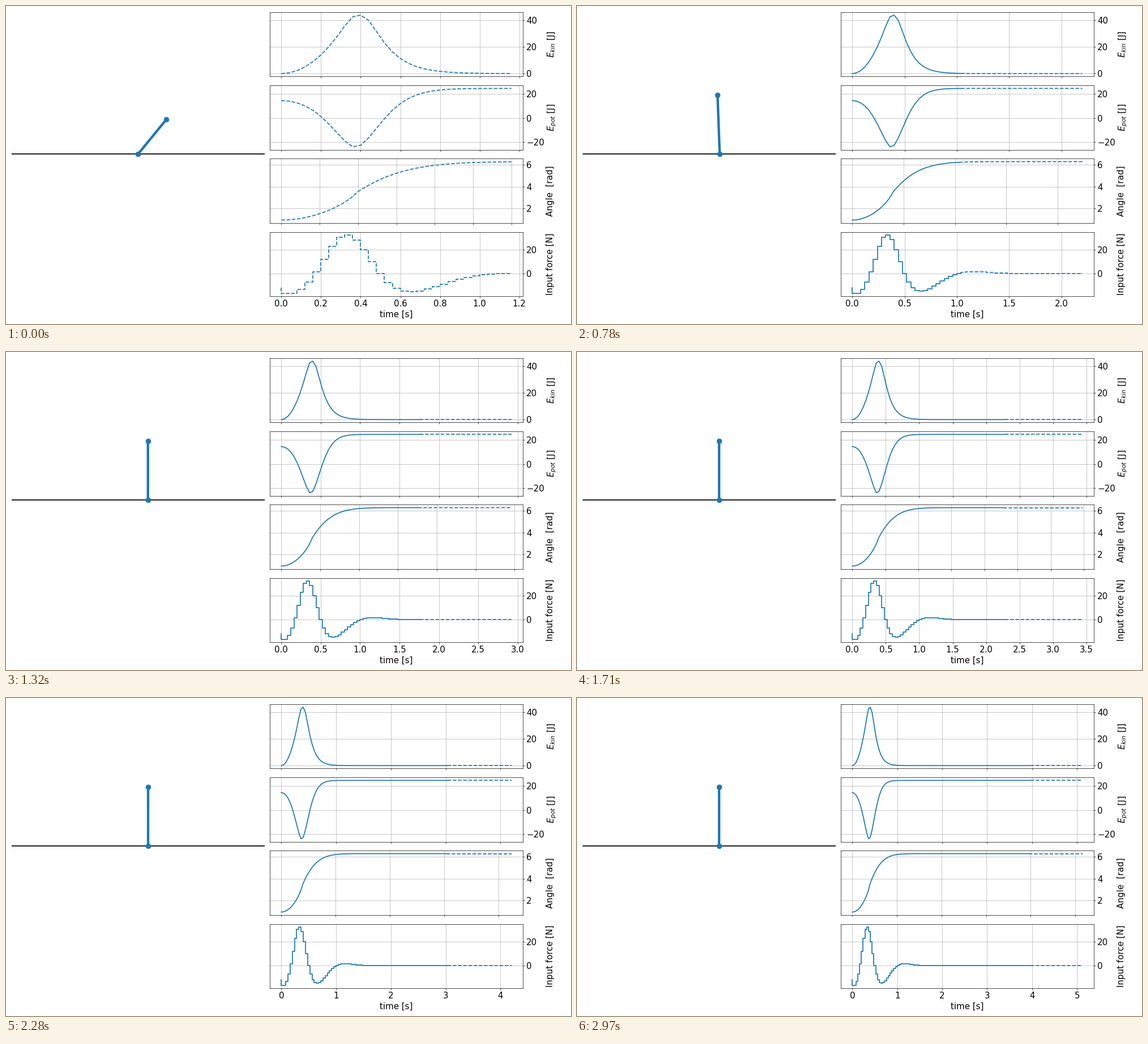
A matplotlib script for the animation above (3000 ms loop, 998 px wide and 561 px high).

```python
import numpy as np
import matplotlib.pyplot as plt
from matplotlib.animation import FuncAnimation

W, H, DPI = 998, 561, 62.4
FRAMES, HORIZON, DT = 100, 30, 0.04
LENGTH = 0.5

plt.rcParams.update({
    "font.family": "DejaVu Sans",
    "axes.labelsize": "xx-large",
    "xtick.labelsize": "xx-large",
    "ytick.labelsize": "xx-large",
    "lines.linewidth": 2,
    "axes.grid": True,
})

k = np.arange(FRAMES + HORIZON + 1)

# Angle: the rod falls ever faster, then eases into the upright pose.
n = np.maximum(k - 10, 0)
fall = 0.3 * np.pi + 0.0232 * k**2 + 0.28 * (k / 10)**10
settle = 2 * np.pi - 2.743 * np.exp(-0.168 * n - 0.0043 * n**2)
theta = np.where(k < 10, fall, settle)

e_pot = 5 * 9.81 * LENGTH * np.cos(theta)
e_kin = np.where(k < 10, 0.56 * k**2 - 3 * (k / 9)**20,
                 43.6 * np.exp(-0.4 * (np.hypot(n, 2) - 2)))

# Force: one skewed swing, then a damped oscillation.
m = np.maximum(k - 13, 0)
phase = 0.44 * (k - 1.75) - 0.13 * np.sin(0.58 * (k - 3))
force = np.where(k < 13, 7.7 - 24.6 * np.cos(phase),
                 -36.5 * np.exp(-0.175 * m) * np.sin(np.pi * m / 13))

# Cart: momentum balance, with the cart ending at rest.
impulse = (np.cumsum(force) - force[0]) * DT
impulse -= impulse[-1] * np.minimum(k / 25, 1)
drift = (np.cumsum(impulse) - impulse / 2) * DT
cart = 0.14 * (np.sin(theta[0]) - np.sin(theta)) + drift / 24.7

fig = plt.figure(figsize=((W + 0.01) / DPI, (H + 0.01) / DPI), dpi=DPI,
                 facecolor="white")


def grid(rows, left, right, hspace=0):
    return fig.add_gridspec(rows, 1, left=left / W, right=right / W,
                            top=1 - 11 / H, bottom=1 - 512 / H, hspace=hspace)


stage = fig.add_subplot(grid(1, 9.5, 456.5)[0])
stage.set(xlim=(-1.8, 1.8), ylim=(-1.2, 1.2))
stage.set_axis_off()
stage.axhline(0, color="black")
rod, = stage.plot([], [], "-o", color="C0", linewidth=5, markersize=10)

rows = grid(4, 466, 913, hspace=15.8 / 113.4)


class Panel:
    def __init__(self, row, label, data, extra=0, style="default"):
        self.data, self.span = data, HORIZON + extra
        self.ax = ax = fig.add_subplot(rows[row])
        ax.yaxis.set_label_position("right")
        ax.yaxis.tick_right()
        ax.set_ylabel(label)
        ax.tick_params(axis="x", labelbottom=row == 3)
        low, high = data.min(), data.max()
        pad = 0.05 * (high - low)
        ax.set_ylim(low - pad, high + pad)
        self.past, = ax.plot([], [], "-", color="C0", drawstyle=style)
        self.plan, = ax.plot([], [], "--", color="C0", drawstyle=style)

    def show(self, now, offset=0):
        t = k * DT
        end = now + self.span
        self.past.set_data(t[:now + 1], self.data[:now + 1])
        self.plan.set_data(t[now:end], self.data[now:end] + offset)
        last = t[end - 1]
        self.ax.set_xlim(-0.05 * last, 1.05 * last)


panels = [
    Panel(0, "$E_{kin}$ [J]", e_kin),
    Panel(1, "$E_{pot}$ [J]", e_pot),
    Panel(2, "Angle  [rad]", theta, extra=1),
    Panel(3, "Input force [N]", force, style="steps"),
]
panels[3].ax.set_xlabel("time [s]")
fig.align_ylabels([p.ax for p in panels])

# The first plans are pulled down towards the end of their horizon.
pull = -1.5 * np.exp((np.arange(HORIZON) - HORIZON + 1) / 6)


def update(now):
    x, a = cart[now], theta[now]
    rod.set_data([x, x + LENGTH * np.sin(a)], [0, LENGTH * np.cos(a)])
    for p in panels[:3]:
        p.show(now)
    panels[3].show(now, pull * np.exp(-now / 3))
    return [rod]


anim = FuncAnimation(fig, update, frames=FRAMES, interval=DT * 750, repeat=True,
                     repeat_delay=0, blit=False)
plt.show()
```
